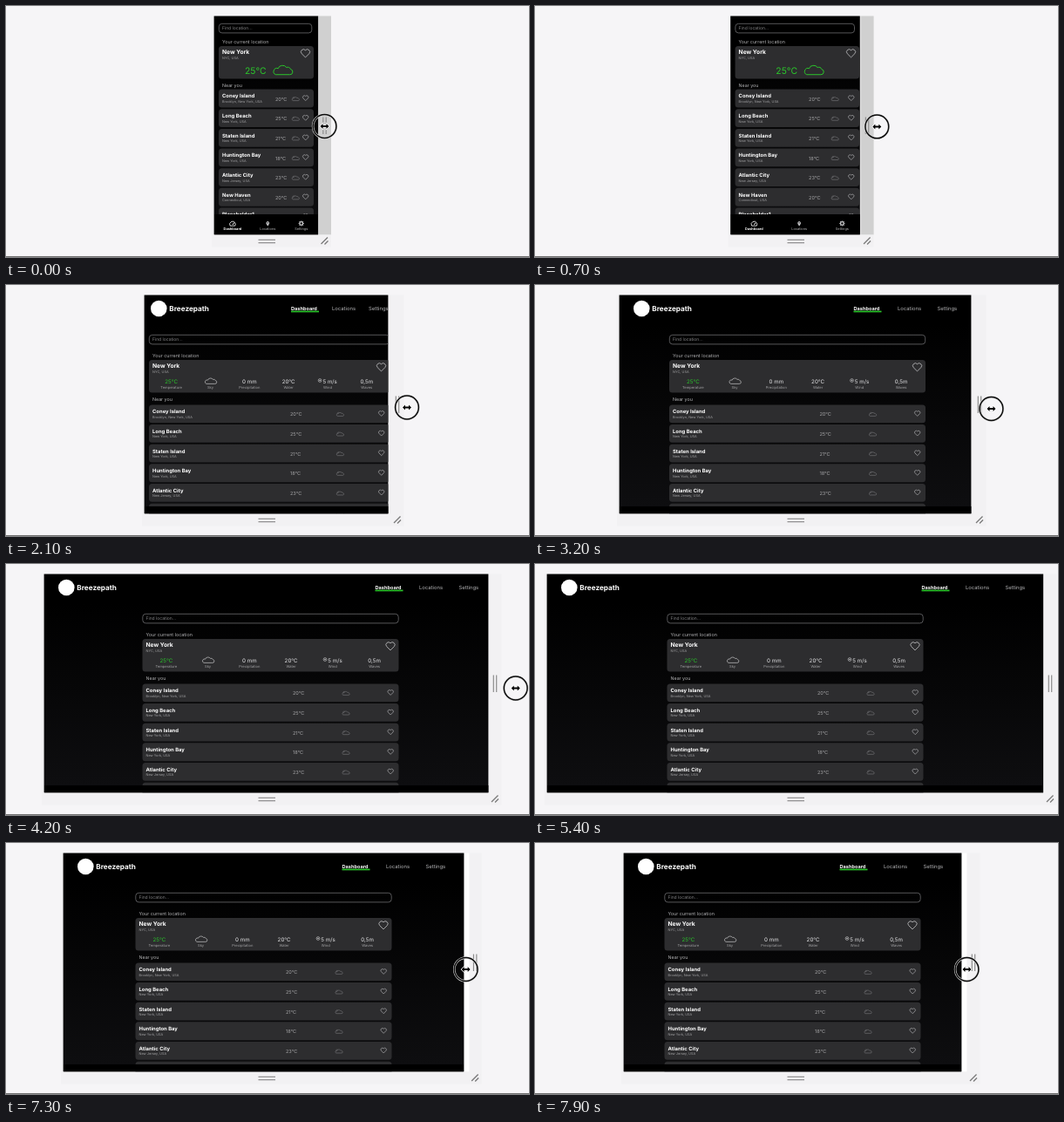
Recreate the animation shown at these times as an HTML page with a canvas. Size 600 by 288 pixels, loop 8 s.

```html
<!DOCTYPE html>
<html lang="en">
<head>
<meta charset="utf-8">
<title>Responsive weather app</title>
<style>
html, body { margin: 0; width: 100%; height: 100%; overflow: hidden; background: #f6f5f7; }
canvas { display: block; width: 600px; height: 288px; }
</style>
</head>
<body>
<canvas id="stage"></canvas>
<script>
const canvas = document.getElementById('stage');
const ctx = canvas.getContext('2d');
const dpr = window.devicePixelRatio || 1;
canvas.width = 600 * dpr;
canvas.height = 288 * dpr;
ctx.textRendering = 'geometricPrecision';

const LOOP = 8000, STEP = 100, CENTER = 298.5, TOP = 11.5, BOTTOM = 262.3;
const GREEN = '#2bc52b', CARD = '#2d2d2f', DIM = '#a2a2a4', SOFT = '#b4b4b6';

// time, left edge, layout lag, grip offset, cursor x, cursor y
const KEYS = [
  [0, 239, 0, 7.5, 365.5, 138],
  [900, 220.5, 6, 9, 400, 138.5],
  [1400, 200, 8, 11, 423.5, 139],
  [1800, 174, 7, 11, 448, 140],
  [2100, 159, 7, 11, 460, 140.5],
  [2700, 125, 6, 11, 498, 141.5],
  [3200, 97, 5, 10, 523.5, 142],
  [3600, 77, 7, 10, 547, 142],
  [4200, 44, 10, 8, 584.7, 142.5],
  [4500, 25, 5, 8, 606, 143],
  [5000, 14, 0, 8, 618, 143],
  [5400, 14, 0, 8, 618, 143],
  [6300, 22, -6, 4, 574, 144.5],
  [6600, 33, -6, 4, 554, 144.5],
  [7200, 60, -6, 7, 533, 145],
  [7900, 102, -6, 8, 495.5, 145]
];
const PLACES = [
  ['Coney Island', 'Brooklyn, New York, USA', 20],
  ['Long Beach', 'New York, USA', 25],
  ['Staten Island', 'New York, USA', 21],
  ['Huntington Bay', 'New York, USA', 18],
  ['Atlantic City', 'New Jersey, USA', 23],
  ['New Haven', 'Connecticut, USA', 20],
  ['Placeholder1', 'New York, USA', 20]
];
const METRICS = [
  ['25°C', 'Temperature'], ['', 'Sky'], ['0 mm', 'Precipitation'],
  ['20°C', 'Water'], ['5 m/s', 'Wind'], ['0,5m', 'Waves']
];
const CLOUD = new Path2D('M-8 5.5H9a3.3 3.3 0 0 0 1-6.5a4 3.6 0 0 0-5-2.2a5.4 4.6 0 0 0-10 1.3a3.8 3.8 0 0 0-3 7.4z');
const SUN = new Path2D('M-8.5-1.5A4 4 0 0 1-3-5.5');
const HEART = new Path2D('M0 5L-4.6 .4A2.9 2.9 0 0 1 0-3.6A2.9 2.9 0 0 1 4.6 .4Z');
const ARROWS = new Path2D('M-5 0L-2-3V-1H2V-3L5 0L2 3V1H-2V3Z');
const PIN = new Path2D('M0 3.2L-1.6 .4A2 2 0 1 1 1.6 .4ZM.7-1A.7 .7 0 1 0-.7-1A.7 .7 0 1 0 .7-1Z');

function pose(t) {
  let i = 0;
  while (i < KEYS.length - 2 && t >= KEYS[i + 1][0]) i++;
  const a = KEYS[i], b = KEYS[i + 1];
  const k = Math.min(1, (t - a[0]) / (b[0] - a[0]));
  return a.map((v, n) => v + (b[n] - v) * k);
}

function text(str, x, y, size, color, align = 'left', weight = 400) {
  ctx.font = `${weight} ${size}px Inter, "Open Sans", sans-serif`;
  ctx.fillStyle = color;
  ctx.textAlign = align;
  ctx.fillText(str, x, y);
}

function rect(x, y, w, h, color) {
  ctx.fillStyle = color;
  ctx.fillRect(x, y, w, h);
}

function card(x, y, w, h) {
  ctx.beginPath();
  ctx.roundRect(x, y, w, h, 3.5);
  ctx.fillStyle = CARD;
  ctx.fill();
}

function line(x1, y1, x2, y2, color, width) {
  ctx.beginPath();
  ctx.moveTo(x1, y1);
  ctx.lineTo(x2, y2);
  ctx.strokeStyle = color;
  ctx.lineWidth = width;
  ctx.stroke();
}

function circle(x, y, r) {
  ctx.beginPath();
  ctx.arc(x, y, r, 0, 7);
}

function icon(path, x, y, scale, color, width, filled) {
  ctx.save();
  ctx.translate(x, y);
  ctx.scale(scale, scale);
  ctx.fillStyle = ctx.strokeStyle = color;
  ctx.lineWidth = width / scale;
  if (filled) ctx.fill(path, 'evenodd');
  else ctx.stroke(path);
  ctx.restore();
}

function search(x, y, w) {
  ctx.beginPath();
  ctx.roundRect(x + .3, y + .3, w - .6, 10.6, 3.5);
  ctx.strokeStyle = '#6c6c6f';
  ctx.lineWidth = .8;
  ctx.stroke();
  text('Find location...', x + 4, y + 7.3, 5, '#858587');
}

// Headings and the card of the current place
function current(x, y, w) {
  text('Your current location', x + 4, y - 3, 5.4, SOFT);
  card(x, y, w, 37.5);
  text('New York', x + 4, y + 8.7, 6.7, '#fff', 'left', 700);
  text('NYC, USA', x + 4, y + 14.8, 3.9, DIM);
  icon(HEART, x + w - 9.5, y + 8.2, .95, SOFT, .9);
  text('Near you', x + 4, y + 46.7, 5.3, SOFT);
}

function rows(x, top, w) {
  PLACES.forEach(([name, area, temp], i) => {
    const y = top + i * 22.65;
    const cloudX = x + w * .785 + 2.4;
    card(x, y, w, 20.8);
    text(name, x + 4, y + 9.8, 5.9, '#fff', 'left', 700);
    text(area, x + 4, y + 15.3, 3.85, DIM);
    text(temp + '°C', x + w * .581 + 1.6, y + 13, 5.6, DIM);
    icon(CLOUD, cloudX, y + 11, .36, '#6f6f71', .7);
    icon(SUN, cloudX, y + 11, .36, '#6f6f71', .7);
    icon(HEART, x + w - 9.3, y + 10, .6, DIM, .75);
  });
}

function mobile(x, w) {
  const px = x + 5, pw = w - 10, mid = px + pw / 2;
  search(px, 20, w * .9);
  current(px, 46, pw);
  text('25°C', mid - 24.5, 78, 10.4, GREEN);
  icon(CLOUD, mid + 18.5, 73.5, .95, GREEN, 1);
  rows(px, 95.6, pw);
  rect(x, 239, w, 24, '#000');
  const tabs = [x + w * .176, x + w * .515, x + w * .838];
  ['Dashboard', 'Locations', 'Settings'].forEach((label, i) =>
    text(label, tabs[i], 257, 3.9, i ? SOFT : '#fff', 'center', i ? 400 : 700));
  ctx.beginPath();
  ctx.arc(tabs[0], 250.5, 3.3, 2.6, 6.8);
  ctx.closePath();
  ctx.strokeStyle = '#fff';
  ctx.lineWidth = .8;
  ctx.stroke();
  line(tabs[0], 251, tabs[0] + 1.8, 248.5, '#fff', 1);
  icon(PIN, tabs[1], 249.8, .95, '#c4c4c6', 1, true);
  circle(tabs[2], 249.5, 1.8);
  ctx.strokeStyle = '#c4c4c6';
  ctx.lineWidth = 1.3;
  ctx.stroke();
  for (let i = 0; i < 8; i++) {
    const c = Math.cos(i * Math.PI / 4), s = Math.sin(i * Math.PI / 4);
    line(tabs[2] + c * 2, 249.5 + s * 2, tabs[2] + c * 3.1, 249.5 + s * 3.1, '#c4c4c6', 1.1);
  }
}

function desktop(x, w) {
  const wide = w >= 304, right = x + w;
  const pad = wide ? 16 : 7;
  const pw = Math.min(294, w - 10), px = x + (w - pw) / 2;
  circle(x + pad + 9.3, 27, 9.3);
  ctx.fillStyle = '#fff';
  ctx.fill();
  text('Breezepath', x + pad + 21.3, 30, 8.2, '#fff', 'left', 700);

  const nav = wide ? [139.5, 89, 43.5] : [118, 71, 29];
  rect(right - nav[0], 29.6, 32, 1.7, GREEN);
  ['Dashboard', 'Locations', 'Settings'].forEach((label, i) =>
    text(label, right - nav[i], 29, i ? 5.9 : 5.6, i ? SOFT : '#fff', 'left', i ? 400 : 700));

  search(px, 57, pw);
  current(px, 86, pw);
  METRICS.forEach(([value, label], i) => {
    const mx = px + pw * (.093 + .1624 * i);
    const wind = label === 'Wind';
    text(value, mx + (wind ? 2.7 : 0), 112.8, 6.2, i ? '#e4e4e6' : GREEN, 'center');
    text(label, mx, 118.7, 4.1, DIM, 'center');
    if (label === 'Sky') icon(CLOUD, mx, 110.2, .58, '#c4c4c6', .7);
    if (wind) {
      circle(mx - 8.8, 109.5, 1.9);
      ctx.strokeStyle = '#d0d0d2';
      ctx.lineWidth = .6;
      ctx.stroke();
      circle(mx - 8.8, 109.5, .8);
      ctx.fillStyle = '#d0d0d2';
      ctx.fill();
    }
  });
  rows(px, 137.4, pw);
  rect(x, 254, w, 9, '#000');
}

function cursor(x, y) {
  circle(x, y, 13.4);
  ctx.strokeStyle = '#dcdcdc';
  ctx.lineWidth = 2.6;
  ctx.stroke();
  ctx.strokeStyle = '#0a0a0a';
  ctx.lineWidth = 1.5;
  ctx.stroke();
  icon(ARROWS, x, y, 1, '#fff', 1.5);
  icon(ARROWS, x, y, 1, '#000', 1, true);
}

function draw(t) {
  const [, left, lag, gripOffset, cx, cy] = pose(t);
  const right = 2 * CENTER - left, width = right - left;
  const layout = width + lag, grip = right + gripOffset;
  const height = BOTTOM - TOP;

  ctx.setTransform(dpr, 0, 0, dpr, 0, 0);
  rect(0, 0, 600, 288, '#f6f5f7');
  rect(0, 287, 600, 1, '#727272');

  // Device frame with its grips
  rect(left - 3, TOP, grip + 10.5 - left, 265, '#f2f1f3');
  if (t < 1700) rect(grip - 7.5, TOP, 15, height, '#d0d0d0');
  for (const d of [-1.7, 1.7]) {
    line(grip + d, 127.5, grip + d, 147, '#8c8c8c', 1.2);
    line(289.5, 270 + d, 309, 270 + d, '#8c8c8c', 1.2);
  }
  line(grip - 4, 273, grip + 3.5, 265.5, '#777', 1.3);
  line(grip, 273.5, grip + 4, 269.5, '#777', 1.3);

  ctx.save();
  ctx.beginPath();
  ctx.rect(left - .4, TOP, width + .8, height);
  ctx.clip();
  rect(left - 1, TOP - 1, width + 2, height + 2, '#fff');
  const shade = ctx.createLinearGradient(0, 45, 0, 254);
  shade.addColorStop(0, '#000');
  shade.addColorStop(1, '#0e0e10');
  rect(left - 1, TOP - 1, layout + 1.4, height + 2, shade);
  (layout < 246 ? mobile : desktop)(left, layout);
  ctx.restore();

  cursor(cx, cy);
}

function tick() {
  draw(Math.floor(performance.now() % LOOP / STEP) * STEP);
  requestAnimationFrame(tick);
}
tick();
</script>
</body>
</html>
```
